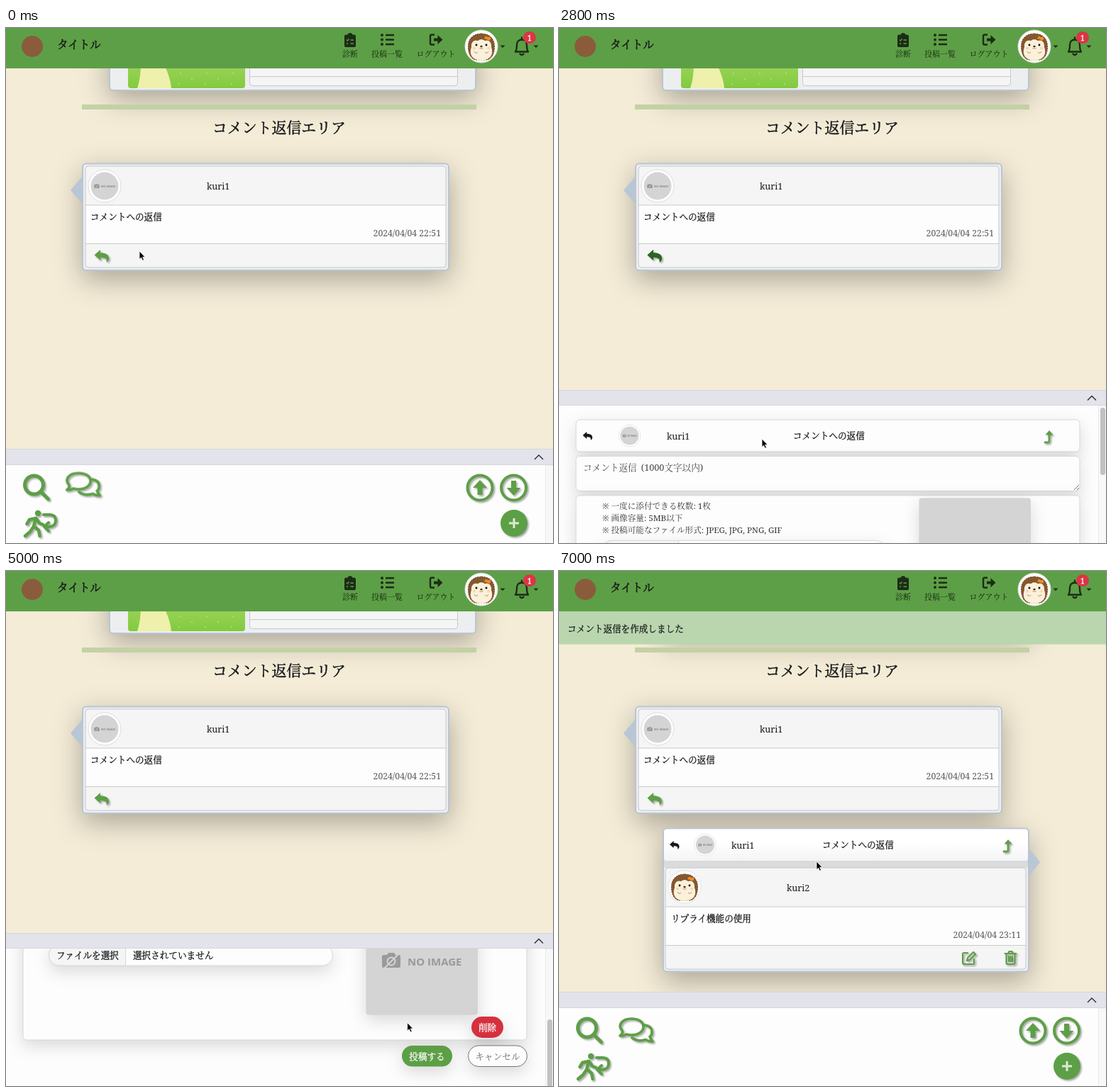
These frames come from a looping animation (771 by 727 pixels, 7.1 s). An HTML page:

```html
<!DOCTYPE html>
<html lang="ja">
<head>
<meta charset="utf-8">
<title>コメント返信</title>
<style>
html, body { margin: 0; width: 100%; height: 100%; overflow: hidden; background: #f4ecd7; }
svg.stage { display: block; width: 771px; height: 727px; }
text {
  font: 500 12.6px "Noto Serif", "Noto Serif CJK JP", "Noto Serif JP", "Noto Sans CJK JP", "Noto Sans CJK", serif;
  fill: #16181a; white-space: pre;
}
/* A thin outline gives the weight between regular and bold. */
text.semi { stroke: #16181a; stroke-width: .3px; }
text.title { stroke: #16181a; stroke-width: .5px; }
text.latin { font-weight: 400; }
text.date { font-size: 12.2px; font-weight: 400; fill: #55585b; text-anchor: end; }
text.nav { font-size: 11px; fill: #16260f; text-anchor: middle; }
text.note { font-size: 11.6px; fill: #33363a; }
text.hint { fill: #44494e; word-spacing: 3px; }
text.mid { text-anchor: middle; }
text.white { fill: #fff; stroke: #fff; stroke-width: .3px; }
text.sans { font: 700 15px "Open Sans", sans-serif; fill: #9a9a9a; }
.green { fill: #5d9f46; }
.dark { fill: #2c6423; }
.ink { fill: #1c2c16; }
.line { fill: none; stroke: #5d9f46; stroke-width: 4; stroke-linecap: round; stroke-linejoin: round; }
.lift { filter: drop-shadow(2px 2px 1px rgba(0,0,0,.32)); }
.deep { filter: drop-shadow(0 12.6px 19px rgba(0,0,0,.3)); }
.soft { filter: drop-shadow(0 8px 11px rgba(0,0,0,.14)); }
.outer { fill: #eceef0; stroke: #b9c5d3; stroke-width: 2; }
.field { fill: #fdfdfd; stroke: #d5d7da; }
.bounce {
  transform-box: fill-box; transform-origin: center;
  animation: bounce 1s cubic-bezier(.28,.84,.42,1) infinite paused;
}
@keyframes bounce {
  0%, 64%, 100% { transform: none; }
  10% { transform: scale(1.1,.9); }
  30% { transform: scale(.9,1.1) translateY(-20px); }
  50% { transform: scale(1.05,.95); }
  57% { transform: translateY(-5px); }
}
</style>
</head>
<body>
<svg class="stage" viewBox="0 0 771 727">
<defs>
  <linearGradient id="grass" x2="0" y2="1"><stop stop-color="#9bd35a"/><stop offset="1" stop-color="#82cb3e"/></linearGradient>
  <linearGradient id="strip" x2="0" y2="1"><stop offset=".4" stop-color="#fff"/><stop offset="1" stop-color="#f4f4f5"/></linearGradient>
  <clipPath id="view"><path d="M0 533H771V727H0z"/></clipPath>

  <path id="reply" stroke-linejoin="round" d="M0 7.5 8.5 0V4.3C16 4.5 20.5 7 20.5 12 20.5 15 19 17 17 18 18.5 12.5 15 11 8.5 10.8V15z"/>
  <g id="levelup">
    <path d="M1 17H5Q7 17 7 15V6" fill="none" stroke="#5d9f46" stroke-width="2.8" stroke-linecap="round"/>
    <path class="green" d="M1.5 6.5 7 0 12.5 6.5z"/>
  </g>
  <g id="camera">
    <path d="M-12 -8Q-12 -9 -11 -9H-6L-4 -12H4L6 -9H11Q13 -9 13 -7V7Q13 9 11 9H-11Q-13 9 -13 7V-8z"/>
    <circle r="5.5" fill="none" stroke="#d4d4d4" stroke-width="2"/>
    <path d="M-10 10 11 -11" stroke="#d4d4d4" stroke-width="2"/>
  </g>
  <g id="blank">
    <circle r="23" fill="#fff" stroke="#dcdcdc"/>
    <circle r="19.5" fill="#d4d4d4"/>
    <use href="#camera" transform="translate(-11 .5) scale(.27)" fill="#8d8d8d"/>
    <text x="-5" y="2.3" class="sans" style="font-size:4px;fill:#8d8d8d">NO IMAGE</text>
  </g>
  <g id="pet">
    <circle r="23" fill="#fff" stroke="#e2e2e2"/>
    <path d="M0 -18C11 -18 18 -12 18.500 -1 19 9 15 18 8 19H-8C-15 18 -19 9 -18.500 -1 -18 -12 -11 -18 0 -18z" fill="#84582f" stroke="#6d4524" stroke-dasharray="2 1.500"/>
    <path d="M-14 1C-15 -7 -9 -10 -5 -8Q0 -12 5 -8C9 -10 15 -7 14 1 18 12 12 19.500 0 19.500S-18 12 -14 1z" fill="#fbf0d9"/>
    <circle cx="-7" cy="-2" r="1.400"/><circle cx="7" cy="-2" r="1.400"/>
    <ellipse rx="1.700" ry="1.200" fill="#4a2a18"/>
    <path d="M-2.500 2.500Q-1 4 0 2.500 1 4 2.500 2.500M-10 7Q-8 11 -5 8M10 7Q8 11 5 8" fill="none" stroke="#a07850" stroke-width=".8"/>
    <circle cx="-10" cy="2.500" r="2" fill="#f8d2bd"/><circle cx="10" cy="2.500" r="2" fill="#f8d2bd"/>
    <path d="M4 -11Q6 -17 9 -13 14 -15 13 -10 10 -7 8 -10z" fill="#f28c28"/>
  </g>
  <g id="card">
    <rect width="508" height="143" rx="4" fill="#f5f5f5"/>
    <path d="M0 55H508V109H0z" fill="#fdfdfd"/>
    <path d="M0 55H508M0 109.5H508" stroke="#c9cacb"/>
    <rect width="508" height="143" rx="4" fill="none" stroke="#c6c8ca"/>
  </g>
  <path id="caret" class="ink" d="M-3.5 -1.5H3.5L0 2z"/>
</defs>

<rect width="771" height="727" fill="#f4ecd7"/>

<!-- parent comment -->
<rect class="outer deep" x="146" y="20" width="516" height="68" rx="5"/>
<path fill="url(#grass)" d="M172 50H337V81Q337 85 333 85H176Q172 85 172 81z"/>
<path fill="#eef0ab" d="M190 50H222Q232 70 233 85H185Q190 70 190 50z"/>
<path stroke="#d5ecae" stroke-width="1.6" stroke-linecap="round" stroke-dasharray="0 37" d="M246 64H334M262 72H330M244 79H330"/>
<path fill="#fdfdfd" d="M343.5 50H636.5V68H343.5z"/>
<path fill="#f5f5f5" stroke="#c6c8ca" d="M343.5 50V77.5Q343.5 81.5 347.5 81.5H632.5Q636.5 81.5 636.5 77.5V50M343.5 68.5H636.5"/>

<path fill="#c3d1a5" d="M107 108H663V115H107z"/>
<text x="385" y="148" class="title mid" style="font-size:20.9px">コメント返信エリア</text>

<!-- first reply -->
<rect class="outer deep" x="108" y="191.5" width="516" height="150.5" rx="5"/>
<path fill="#b9c6d5" d="M91 229 108 209V249z"/>
<use href="#card" x="112" y="195"/>
<use href="#blank" x="139" y="223"/>
<text x="283" y="228" class="latin">kuri1</text>
<text x="119" y="271" class="semi">コメントへの返信</text>
<text x="613" y="294" class="date">2024/04/04 22:51</text>
<use href="#reply" x="124.5" y="313" class="green lift"/>
<use href="#reply" x="124.5" y="313" class="dark" data-on="600 3300"/>

<!-- posted reply -->
<g data-on="5100 7100">
  <rect class="outer deep" x="147" y="363.5" width="515" height="202" rx="5"/>
  <path fill="#b9c6d5" d="M678 411 662 391V431z"/>
  <path fill="#d9dbdd" d="M148 405H661V419H148z"/>
  <rect x="148" y="364.5" width="513" height="44.5" rx="4" fill="url(#strip)"/>
  <use href="#reply" transform="translate(156 381) scale(.66)" fill="#16181a"/>
  <use href="#blank" transform="translate(206 386.5) scale(.67)"/>
  <text x="243" y="392" class="latin">kuri1</text>
  <text x="371" y="391" class="semi">コメントへの返信</text>
  <use href="#levelup" x="626" y="379" class="lift"/>
  <use href="#card" x="150" y="419"/>
  <use href="#pet" x="177" y="446"/>
  <text x="321" y="452" class="latin">kuri2</text>
  <text x="158" y="495" class="semi">リプライ機能の使用</text>
  <text x="651" y="518" class="date">2024/04/04 23:11</text>
  <g class="line lift" style="stroke-width:2.2">
    <path d="M576 539H571Q569 539 569 541V553Q569 555 571 555H583Q585 555 585 553V548M575 550 576 546 584 538 587 541 579 549z"/>
    <path d="M628.5 540H644.5M633 540 634.5 537H638.5L640 540M630.5 541V553Q630.5 555 632.5 555H640.5Q642.5 555 642.5 553V541M634 544V551M636.5 544V551M639 544V551"/>
  </g>
</g>

<!-- header -->
<rect width="771" height="57" fill="#5d9f46"/>
<circle cx="37" cy="26" r="15" fill="#8a5c3c"/>
<text x="72" y="29" class="title" style="font-size:15.5px">タイトル</text>
<g class="ink">
  <path d="M479 9.5H481.5Q482 7 485 7T488.5 9.5H491Q493 9.5 493 11.5V25Q493 27 491 27H479Q477 27 477 25V11.5Q477 9.5 479 9.5z"/>
  <path d="M480 16.5 481.5 18 483.5 15M485.5 17H490M480 22H482M485.5 22H490" fill="none" stroke="#5d9f46" stroke-width="1.3"/>
  <circle cx="530" cy="10" r="2"/><circle cx="530" cy="16.5" r="2"/><circle cx="530" cy="23" r="2"/>
  <path d="M535 10H547M535 16.5H547M535 23H547" stroke="#1c2c16" stroke-width="2.4"/>
  <path d="M604 9.5H600Q598 9.5 598 11.5V21.5Q598 23.5 600 23.5H604" fill="none" stroke="#1c2c16" stroke-width="2.4"/>
  <path d="M603 14.5H608.5V10L615.5 16.5 608.5 23V18.5H603z"/>
</g>
<text x="485" y="41" class="nav">診断</text>
<text x="537" y="41" class="nav">投稿一覧</text>
<text x="606" y="41" class="nav">ログアウト</text>
<use href="#pet" x="670" y="26"/>
<use href="#caret" x="700" y="26"/>
<use href="#caret" x="747" y="26"/>
<path d="M718 33.5C720 31 720 28 720 24 720 19 723 16.5 727 16.5S734 19 734 24C734 28 734 31 736 33.5zM727 16V13.5M724.5 36.5Q727 39.5 729.5 36.5" fill="none" stroke="#1c2c16" stroke-width="2.4" stroke-linejoin="round" stroke-linecap="round"/>
<rect x="729" y="5" width="18" height="17" rx="8.5" fill="#dc3545"/>
<text x="738" y="17.5" class="white mid" style="font-size:10.5px">1</text>

<g data-on="5100 7100">
  <rect y="57" width="771" height="46.5" fill="#bad6ae"/>
  <text x="12" y="86" class="semi">コメント返信を作成しました</text>
</g>

<!-- closed panel -->
<g data-on="0 1100 5100 7100">
  <rect y="594" width="771" height="133" fill="#fdfdfd"/>
  <path fill="#f8f8f9" stroke="#e8e8e8" d="M760.5 617H772V728H760.5z"/>
  <path fill="#e3e4eb" stroke="#d3d6dc" d="M-1 594.5H772V616.5H-1z"/>
  <path d="M745 609 751 603 757 609" fill="none" stroke="#25282c" stroke-width="1.3"/>
  <g class="line lift">
    <g style="stroke-width:5"><circle cx="39.5" cy="645" r="13"/><path d="M49.5 655 59.5 665"/></g>
    <circle cx="668" cy="649" r="17.5"/><circle cx="715.5" cy="649" r="17.5"/>
  </g>
  <g class="bounce" id="chat"><g class="line lift" style="stroke-width:3.7">
    <path d="M86 656C89 654 90 652 89 649 82 641 89 632 102 632 113 632 119 637 119 643.5 119 650 112 655 102 655 99 655 97 654.5 95 654 92 656 89 656.5 86 656z"/>
    <path d="M121 641C128 642 131 646 131 650.5 131 653.5 130 656 128 657.5 129 660 130 662 132 664 128 664.5 125 663.5 122 661.5 114 664 107 662 103 659"/>
  </g></g>
  <g class="line lift">
    <circle class="green" cx="45" cy="685" r="2.2"/>
    <path style="stroke-width:4.5" d="M42 692 39 703 46 709 47.5 717M38 705 34 711 27 717M42 692 33 694 29.5 700M43 693 47 699 52 701"/>
    <path d="M53 687H61C68 687 70 691 70 695 70 701 66 704 61 704H54M60 698 54 704 60 710"/>
  </g>
  <path class="green lift" d="M668 638 678 649H671.5V659H664.5V649H658z"/>
  <path class="green lift" d="M715.5 660 705.5 649H712V639H719V649H725.5z"/>
  <circle class="green lift" cx="716" cy="699" r="19"/>
  <path d="M716 692V706M709 699H723" stroke="#d9ecd1" stroke-width="3"/>
</g>

<!-- open panel -->
<g data-on="1100 5100">
  <rect y="511" width="771" height="216" fill="#fdfdfd"/>
  <path fill="#f8f8f9" stroke="#e8e8e8" d="M760.5 533H772V728H760.5z"/>
  <rect id="thumb" x="763" y="536" width="7" height="95" rx="3.5" fill="#c1c1c3"/>
  <g clip-path="url(#view)"><g id="form">
    <rect class="field soft" x="24" y="553" width="710" height="45" rx="5"/>
    <use href="#reply" transform="translate(33.5 570) scale(.66)" fill="#16181a"/>
    <use href="#blank" transform="translate(99.5 575.5) scale(.67)"/>
    <text x="152" y="581" class="latin">kuri1</text>
    <text x="330" y="580" class="semi">コメントへの返信</text>
    <use href="#levelup" x="684" y="568" class="lift"/>

    <rect class="field soft" x="24" y="604.5" width="710" height="49" rx="5"/>
    <text x="34" y="625" class="hint" data-on="1100 3400">コメント返信 (1000文字以内)</text>
    <rect x="24" y="604.5" width="710" height="49" rx="5" fill="none" stroke="#7aa9e6" data-on="3300 4400"/>
    <text id="typed" x="34.5" y="625" class="semi"></text>
    <path id="mark" d="M0 612V629" stroke="#16181a" data-on="3300 4100"/>
    <path d="M726 652 733 645M730 652 733 649" stroke="#777"/>

    <rect class="field soft" x="24" y="660" width="710" height="198" rx="5"/>
    <text x="61" y="679" class="note">※ 一度に添付できる枚数: 1枚</text>
    <text x="61" y="696" class="note">※ 画像容量: 5MB以下</text>
    <text x="61" y="712.5" class="note">※ 投稿可能なファイル形式: JPEG, JPG, PNG, GIF</text>
    <rect class="field soft" x="60.5" y="723.5" width="400" height="29.5" rx="14.7"/>
    <path fill="#f5f5f6" stroke="#d5d7da" d="M168.5 723.5H75A14.7 14.7 0 0 0 75 753H168.5z"/>
    <text x="71" y="743" class="semi">ファイルを選択</text>
    <text x="179" y="743" class="semi">選択されていません</text>
    <rect class="soft" x="507.5" y="663.5" width="157.5" height="159" rx="4" fill="#d4d4d4"/>
    <use href="#camera" x="543" y="747" fill="#9a9a9a"/>
    <text x="566" y="752.5" class="sans">NO IMAGE</text>
    <rect class="soft" x="656" y="825" width="45" height="30" rx="15" fill="#d6303f"/>
    <text x="678.5" y="845" class="white mid">削除</text>
    <rect class="green soft" x="558" y="866" width="71" height="29.5" rx="14.7"/>
    <text x="593.5" y="885.5" class="white mid">投稿する</text>
    <rect class="soft" x="651.5" y="866" width="83" height="29.5" rx="14.7" fill="#fdfdfd" stroke="#6c757d"/>
    <text x="693" y="885.5" class="mid" style="fill:#5c656d">キャンセル</text>
  </g></g>
  <path fill="#e3e4eb" stroke="#d3d6dc" d="M-1 511.5H772V532.5H-1z"/>
  <path d="M745 525.5 751 519.5 757 525.5" fill="none" stroke="#25282c" stroke-width="1.3"/>
</g>

<g data-on="1000 2200">
  <path fill="#dfe6f6" stroke="#b9c3d8" d="M-1 715.5H234Q237 715.5 237 718.5V728H-1z"/>
  <text x="1" y="727" style="font:400 10.3px 'Liberation Sans',Arial,sans-serif;fill:#3a3d42">localhost:3000/comment_replies/6/reply_to_parent</text>
</g>

<!-- pointer shapes -->
<g id="pointer" stroke="#fff">
  <path data-on="0 600 2000 3100 4000 4500 4900 7100" d="M0 0V11.5L2.6 9.2 4.5 13.3 6.5 12.4 4.6 8.4H8z" stroke-width=".8"/>
  <path data-on="600 2000 4500 4900" fill="#fff" stroke="#111" stroke-linejoin="round" d="M-1.5 1Q0 -1 1.2 1V5.5Q3 4.5 3.7 6 5.5 5.2 6.2 6.7 8 6.3 8.2 8V11Q8 13 6.5 14.5H0L-4.5 8.5Q-4 6.5 -1.5 8.5z"/>
  <path data-on="3100 4000" fill="none" stroke="#111" stroke-width="1.2" d="M-3 -6.5Q0 -6.5 0 -4.5V4.5Q0 6.5 3 6.5M3 -6.5Q0 -6.5 0 -4.5V4.5Q0 6.5 -3 6.5"/>
</g>
</svg>

<script>
const LOOP = 7100, STEP = 100, POSTED = 5052, MESSAGE = 'リプライ機能の使用';
const $ = id => document.getElementById(id);

// Each data-on list alternates show and hide times.
const timed = [...document.querySelectorAll('[data-on]')]
  .map(el => ({ el, bounds: el.dataset.on.split(' ').map(Number) }));

const route = [
  [0, 188, 315], [200, 188, 315], [700, 137, 320], [1900, 137, 320],
  [2400, 230, 500], [2800, 286, 580], [3100, 246, 614], [3300, 244, 626],
  [3900, 244, 626], [4000, 400, 666], [4200, 508, 664], [4300, 517, 660],
  [4600, 593, 684], [4900, 593, 684], [5200, 511, 545], [5500, 511, 545],
  [6400, 363, 410], [LOOP, 363, 410]
];
const scroll = [[0, 0], [4000, 0], [4200, 196], [LOOP, 196]];
const typing = [[3400, 4], [3500, 6], [3600, 9]];

function at(keys, t) {
  const i = keys.findIndex(k => k[0] > t);
  const [a, b] = [keys[i - 1], keys[i]];
  const p = (t - a[0]) / (b[0] - a[0]);
  return a.slice(1).map((v, n) => v + (b[n + 1] - v) * p);
}

function draw(now) {
  const t = Math.floor(now % LOOP / STEP) * STEP;

  for (const { el, bounds } of timed)
    el.style.display = bounds.filter(b => b <= t).length % 2 ? '' : 'none';

  $('pointer').setAttribute('transform', `translate(${at(route, t)})`);

  const [y] = at(scroll, t);
  $('form').setAttribute('transform', `translate(0 ${-y})`);
  $('thumb').setAttribute('y', 536 + y * 97 / 196);

  const count = typing.reduce((n, [from, len]) => t >= from ? len : n, 0);
  const typed = $('typed');
  typed.textContent = MESSAGE.slice(0, count);
  const end = count ? typed.getComputedTextLength() : 0;
  $('mark').setAttribute('transform', `translate(${Math.round(35 + end) - .5} 0)`);

  // The bounce restarts once the reply is posted.
  const phase = t < POSTED ? t + 525 : t - POSTED;
  $('chat').style.animationDelay = `${-phase}ms`;

  requestAnimationFrame(draw);
}
requestAnimationFrame(draw);
</script>
</body>
</html>
```
